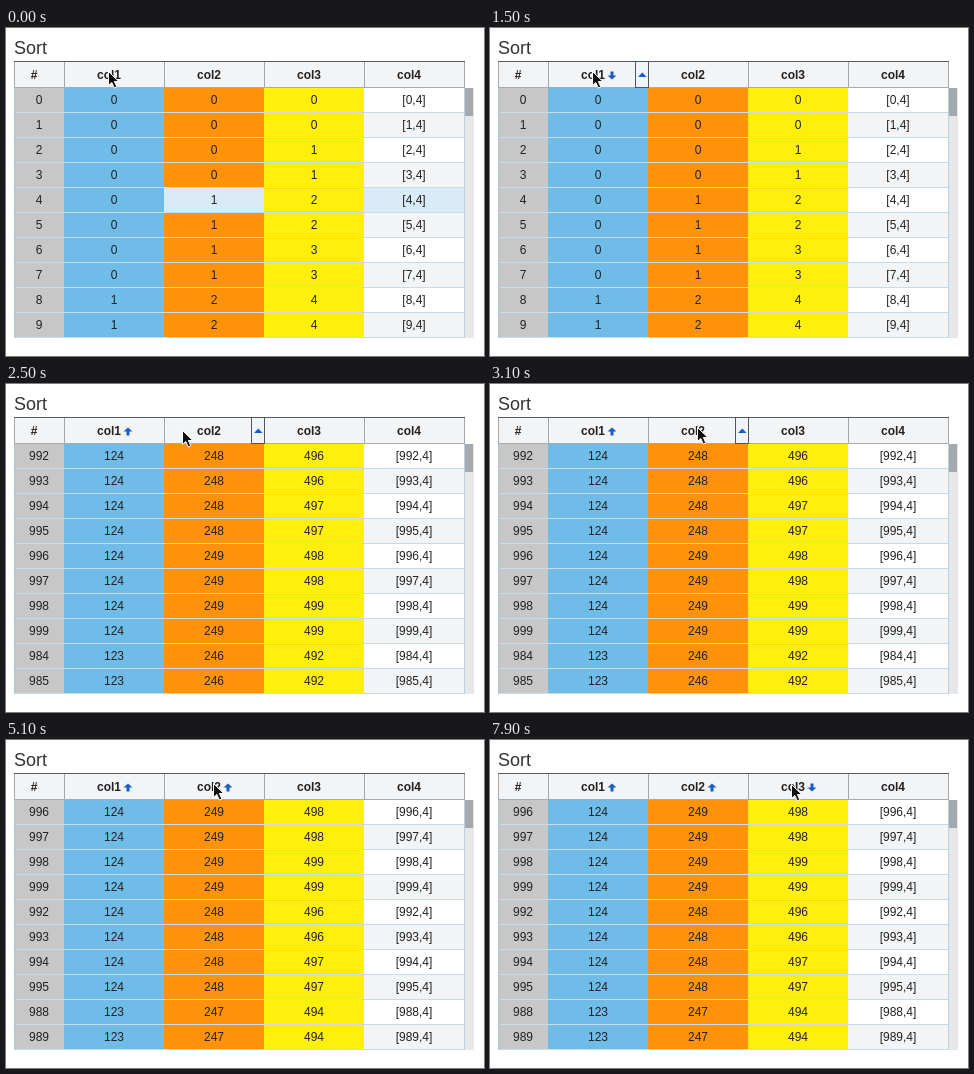
Animation of 478x328 px, one loop 8 s. Source, as an HTML page:

```html
<!DOCTYPE html>
<html lang="en">
<head>
<meta charset="utf-8">
<title>Sort</title>
<style>
html, body { margin: 0; width: 478px; height: 328px; overflow: hidden; background: #fff; }
svg { display: block; }
text { font: 12px "Liberation Sans", Arial, sans-serif; fill: #222; text-anchor: middle; }
.title { font-size: 18px; fill: #333; text-anchor: start; }
.head { font-weight: bold; }
</style>
</head>
<body>
<svg id="stage" width="478" height="328" viewBox="0 0 478 328"></svg>
<script>
const LOOP = 8000, STEP = 100, ROWS = 10, ROW_H = 25, TOP = 60;
const COLS = [
  { x: 8, w: 50, name: '#', fill: '#c7c7c7', value: i => i },
  { x: 58, w: 100, name: 'col1', fill: '#6fbce9', value: i => i >> 3 },
  { x: 158, w: 100, name: 'col2', fill: '#ff920b', value: i => i >> 2 },
  { x: 258, w: 100, name: 'col3', fill: '#ffef0a', value: i => i >> 1 },
  { x: 358, w: 100, name: 'col4', value: i => `[${i},4]` }
];

// each sort click: time, column, direction
const CLICKS = [[1100, 1, 1], [1800, 1, -1], [3600, 2, 1], [4900, 2, -1], [7000, 3, 1]];
// header menu button: column, shown from, hidden at
const MENUS = [[1, 200, 1100], [1, 1400, 1800], [2, 2300, 3600], [2, 4000, 4900], [3, 6000, 7000]];
// pointer: time, x, y
const PATH = [
  [0, 102, 43], [2000, 102, 43], [2300, 150, 47], [2500, 176, 46], [2800, 197, 44],
  [3100, 207, 43], [5800, 207, 43], [6000, 258, 45], [6200, 288, 44], [6600, 301, 44]
];

const stage = document.getElementById('stage');

function add(tag, attrs, parent = stage) {
  const el = document.createElementNS('http://www.w3.org/2000/svg', tag);
  for (const k in attrs) el.setAttribute(k, attrs[k]);
  return parent.appendChild(el);
}
const rect = (x, y, width, height, fill, parent) => add('rect', { x, y, width, height, fill }, parent);
function label(x, y, str, cls = '') {
  const el = add('text', { x, y, class: cls });
  el.textContent = str;
  return el;
}

label(8, 26, 'Sort', 'title');

// header
rect(8, 33, 451, 27, '#f2f4f6');
for (const c of COLS) {
  rect(c.x, 33, 1, 27, '#a3a7aa');
  label(c.x + c.w / 2 - 5, 51, c.name, 'head');
}
rect(458, 33, 1, 27, '#a3a7aa');
rect(8, 33, 451, 1, '#555b60');
rect(8, 59, 451, 1, '#a9adb0');

// body
const cells = [], hover = add('g', {});
for (let r = 0; r < ROWS; r++) {
  const y = TOP + r * ROW_H;
  for (const c of COLS) {
    rect(c.x, y, c.w, ROW_H, c.fill || (r % 2 ? '#f2f4f6' : '#fff'));
  }
}
stage.appendChild(hover);
for (const c of [COLS[2], COLS[4]]) rect(c.x, TOP + 4 * ROW_H, c.w, ROW_H, '#d9ebf6', hover);
for (let r = 0; r < ROWS; r++) {
  const y = TOP + r * ROW_H;
  rect(8, y + ROW_H - 1, 451, 1, '#c5dceb');
  cells.push(COLS.map(c => label(c.x + c.w / 2, y + 16, '')));
}
rect(8, TOP, 1, 250, '#b5c3cc');
rect(458, TOP, 1, 250, '#b9d3e4');
rect(459, TOP, 9, 250, '#e6e7e8');
rect(459, TOP, 8, 28, '#a4a9ae');

// sort arrows, menu button and pointer
const arrows = COLS.map(c => add('path', {
  d: 'M0-4L4.5 0H1.5V4H-1.5V0H-4.5Z', fill: '#1b5cc9'
}));
const menu = add('g', {});
add('rect', { x: 87.5, y: 33.5, width: 13, height: 26, fill: '#eef4fa', stroke: '#50565b' }, menu);
add('path', { d: 'M90 49L94.3 44.5L98.6 49Z', fill: '#1b5cc9' }, menu);
const pointer = add('path', {
  d: 'M.5.5V14.5L3.8 11.5L6.3 17L8.8 15.9L6.4 10.5H10.8Z',
  fill: '#111', stroke: '#fff', 'stroke-width': 1, 'stroke-linejoin': 'round'
});

// rows after each click, with later columns sorted inside earlier ones
const all = Array.from({ length: 1000 }, (_, i) => i);
const orders = [all.slice(0, ROWS)], states = [{}];
for (const [, col, dir] of CLICKS) {
  const state = { ...states[states.length - 1], [col]: dir };
  const compare = (a, b) => {
    for (const k in state) {
      const d = (COLS[k].value(a) - COLS[k].value(b)) * state[k];
      if (d) return d;
    }
    return a - b;
  };
  states.push(state);
  orders.push([...all].sort(compare).slice(0, ROWS));
}

function place(t) {
  const n = PATH.findIndex(p => p[0] > t);
  if (n < 0) return PATH[PATH.length - 1].slice(1);
  const a = PATH[n - 1], b = PATH[n], k = (t - a[0]) / (b[0] - a[0]);
  return [1, 2].map(i => Math.round(a[i] + (b[i] - a[i]) * k));
}

let shown = -1;
function showSort(n) {
  if (n === shown) return;
  shown = n;
  cells.forEach((row, r) => row.forEach((el, c) => {
    el.textContent = COLS[c].value(orders[n][r]);
  }));
  arrows.forEach((el, c) => {
    const dir = states[n][c];
    el.setAttribute('visibility', dir ? 'visible' : 'hidden');
    el.setAttribute('transform', `translate(${COLS[c].x + 64} 47.5) scale(1 ${dir === 1 ? -1 : 1})`);
  });
}

function draw(time) {
  const t = Math.floor(time % LOOP / STEP) * STEP;
  showSort(CLICKS.filter(c => c[0] <= t).length);
  hover.setAttribute('opacity', t < 100 ? 1 : 0);
  const m = MENUS.find(([, from, to]) => t >= from && t < to);
  menu.setAttribute('opacity', m ? Math.min(1, (t - m[1] + 50) / 150) : 0);
  if (m) menu.setAttribute('transform', `translate(${COLS[m[0]].x} 0)`);
  pointer.setAttribute('transform', `translate(${place(t)})`);
}

function tick() {
  draw(performance.now());
  requestAnimationFrame(tick);
}
tick();
</script>
</body>
</html>
```
